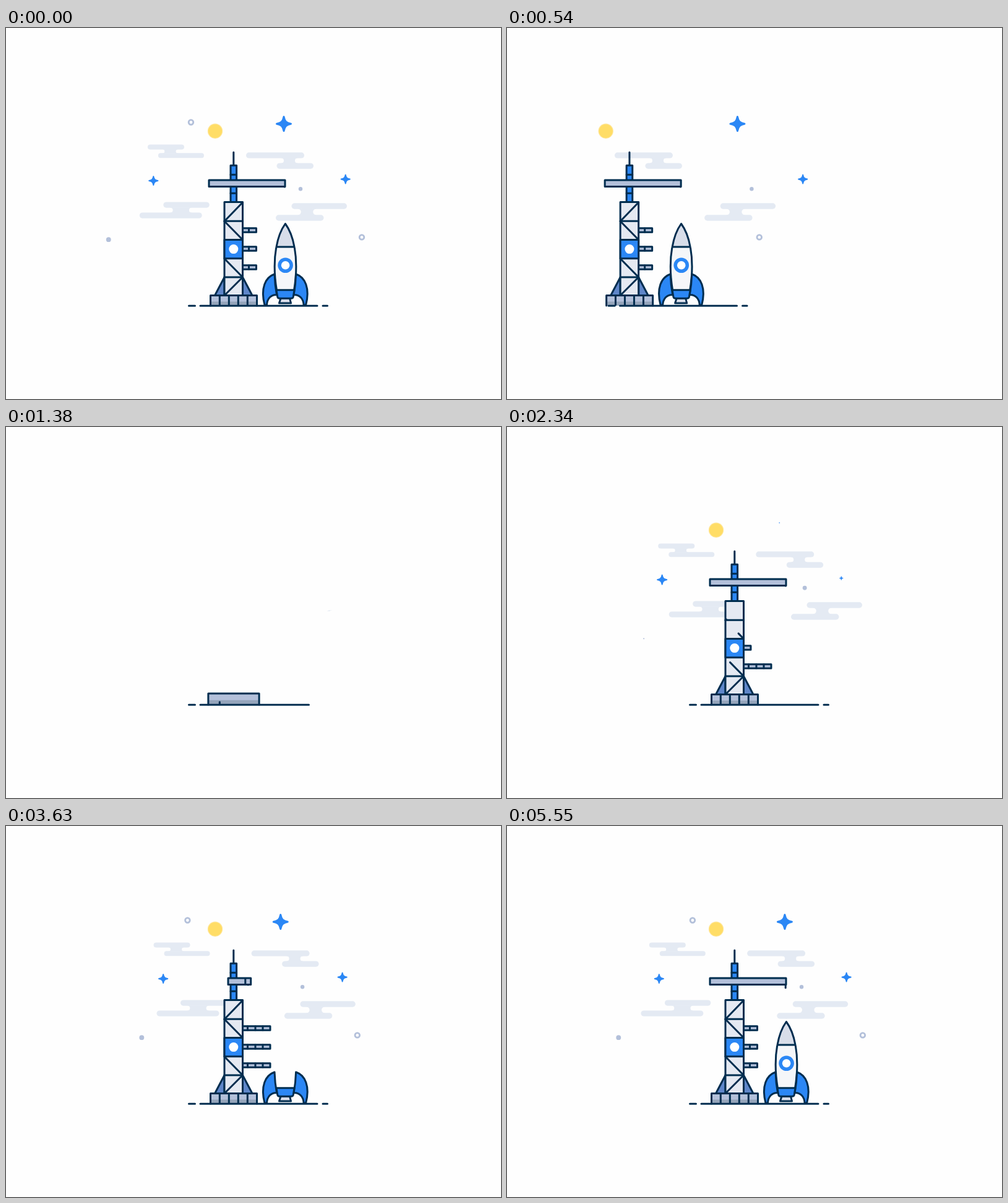
Write an HTML page that moves like this. It is 800 px wide and 600 px high and loops after 5580 ms.

```html
<!DOCTYPE html>
<html lang="en">
<head>
<meta charset="utf-8">
<title>Rocket launch pad</title>
<style>
html, body { margin: 0; width: 100%; height: 100%; overflow: hidden; background: #fefefe; }
svg { display: block; width: 100vw; height: 100vh; }
.ink { stroke: #002d4f; stroke-width: 3; stroke-linecap: round; stroke-linejoin: round; fill: none; }
.ink * { vector-effect: non-scaling-stroke; }
.cloud { fill: #e4eaf3; }
.blue { fill: #2b87f5; }
.steel { fill: #b3c0da; }
.ring { fill: none; stroke: #b3c0da; stroke-width: 2.8; }
.star { fill: #2b87f5; stroke: #2b87f5; stroke-width: 3; stroke-linejoin: round; }
</style>
</head>
<body>
<svg id="stage" viewBox="0 0 800 600"></svg>
<script>
const LOOP = 5580, GONE = 900, BUILD = 1000;
const stage = document.getElementById('stage');
const $ = id => document.getElementById(id);
let now = 0;

// Two rounded bars joined by a neck with scooped sides.
function cloud(x1, x2, y1, x3, x4, y2, h, a, b) {
  const top = y1 + h, r = (y2 - top) / 2;
  const bar = (x, end, y) => `<rect x="${x}" y="${y}" width="${end - x}" height="${h}" rx="${h / 2}"/>`;
  return `<g class="cloud">${bar(x1, x2, y1)}${bar(x3, x4, y2)}
    <path d="M${a} ${top - .5}v.5a${r} ${r} 0 0 1 0 ${2 * r}v.5H${b}v-.5a${r} ${r} 0 0 1 0 ${-2 * r}v-.5Z"/></g>`;
}

const star = (x, y, k) => `<path class="star" transform="translate(${x} ${y}) scale(${k})"
  d="M0-11.5C1.5-4 4-1.5 11.5 0C4 1.5 1.5 4 0 11.5C-1.5 4-4 1.5-11.5 0C-4-1.5-1.5-4 0-11.5Z"/>`;
const disc = (x, y, r, cls) => `<circle cx="${x}" cy="${y}" r="${r}" class="${cls}"/>`;

// pivot, pop-in start, drift per ms, leave start, leave distance after 540 ms
const sky = [
  { x: 275, y: 199, pop: 1400, drift: -.0044, leave: -120, far: 408,
    art: cloud(230, 289, 188.5, 247, 321, 202.3, 8, 254.5, 278.5) },
  { x: 442, y: 214, pop: 1430, drift: -.0044, leave: 0, far: 212.5,
    art: cloud(388, 482, 201.3, 437.5, 497, 218.5, 9.2, 445, 471) },
  { x: 272, y: 294, pop: 1460, drift: -.0141, leave: -80, far: 425,
    art: cloud(254.5, 329, 281.5, 216, 317, 298.5, 9.2, 266, 300) },
  { x: 493, y: 297, pop: 1377, drift: -.0071, leave: 0, far: 116,
    art: cloud(461.5, 551, 283.3, 436, 513.5, 302.3, 9.4, 472, 501) },
  { x: 338, y: 166.7, pop: 1644, drift: 0, leave: 0, far: 177,
    art: '<circle cx="338" cy="166.7" r="12.2" fill="#ffe69a"/><circle cx="338" cy="166.7" r="11" fill="#ffdd66"/>' },
  { x: 299 + 1.6, y: 152.5, pop: 2520, drift: .0037, leave: -130, far: 476, art: disc(300.6, 152.5, 3.8, 'ring') },
  { x: 575, y: 338.4, pop: 2830, drift: .0037, leave: 0, far: 166, art: disc(575, 338.4, 3.8, 'ring') },
  { x: 216.6, y: 342.2, pop: 2322, drift: -.0014, leave: -373, far: 221, art: disc(216.6, 342.2, 3.9, 'steel') },
  { x: 476, y: 260.3, pop: 2200, drift: -.0016, leave: 0, far: 80, art: disc(476, 260.3, 3.2, 'steel') },
  { x: 449, y: 155, pop: 2336, drift: .0027, leave: 0, far: 76, art: star(449, 155, 1) },
  { x: 259.4, y: 247, pop: 2210, drift: .0027, leave: -285, far: 268, art: star(259.4, 247, .62) },
  { x: 548.7, y: 244.5, pop: 2310, drift: .0026, leave: 0, far: 70, art: star(548.7, 244.5, .62) }
];

const armY = [387, 357, 327];
const arm = (y, i) => `<g id="arm${i}"><path class="steel" d="M370 ${y - 3.2}H427V${y + 3.2}H370Z"/>
  <path d="M390.5 ${y - 3}v6M403 ${y - 3}v6M415 ${y - 3}v6"/></g>`;
const diagonals = ['M382.5 403L353.5 432', 'M382.5 403L353 373', 'M382.5 342.5L353 312.5', 'M353 312.5L382.5 282'];
const wing = `<path class="blue" d="M434 398C419 403 411 421 418 448H421.5C422 438 428 431 437.5 431.5Q434.5 415 434 398Z"/>`;

stage.innerHTML = `
<defs>
  <clipPath id="armClip"><rect x="382" y="310" width="60" height="90"/></clipPath>
  <clipPath id="hullClip"><rect id="hullRect" x="425" width="53"/></clipPath>
</defs>
<g id="all">
  ${sky.map((s, i) => `<g id="sky${i}">${s.art}</g>`).join('')}
  <g id="tower" class="ink">
    <g clip-path="url(#armClip)">${armY.map(arm).join('')}</g>
    <g id="braces"><path fill="#5f86c9" d="M353 403L337.5 432.5H353ZM382.5 403L398 432.5H382.5Z"/></g>
    <path id="antenna" d="M367.8 222V201"/>
    <g id="mast"><path class="blue" d="M363 222.3H372.6V281.5H363Z"/><path d="M363 237.3h9.6M363 267.3h9.6"/></g>
    <g id="frame">
      <path fill="#e5e9f2" d="M353 281.5H382.5V432.5H353Z"/>
      <path d="M353 312.3H382.5M353 403H382.5"/>
      <path class="blue" d="M353 342.5H382.5V372.8H353Z"/>
    </g>
    ${diagonals.map((d, i) => `<path id="diag${i}" d="${d}" pathLength="100"/>`).join('')}
    <g id="sign"><circle cx="367.8" cy="357.6" r="7.5" fill="#fff" stroke="none"/></g>
    <g id="boom"><path id="jib" class="steel"/><path id="rope"/></g>
    <g id="base">
      <path fill="#b3c0da" stroke="none" d="M330.5 432.5H405.5V449H330.5Z"/>
      <path fill="#95a5bb" stroke="none" d="M330.5 442.5H405.5V449H330.5Z"/>
      <path d="M330.5 449V432.5H405.5V449"/>
    </g>
    ${[345.3, 360.3, 375.3, 390.3].map((x, i) => `<path id="rib${i}" d="M${x} 448V433" pathLength="100"/>`).join('')}
  </g>
  <g id="ground" class="ink"><path id="line"/></g>
  <g id="rocket" class="ink">
    <path id="hull" fill="#f5f6f9" stroke="none"
      d="M437 354Q431 386 437.5 424H465.5Q472 386 466 354Z"/>
    <g clip-path="url(#hullClip)"><path stroke-linecap="butt" d="M437 353Q431 386 437.5 424M466 353Q472 386 465.5 424"/></g>
    <g id="nozzle"><path fill="#d8dde9" d="M444 437H458.5L460.5 445H441.5Z"/></g>
    <g id="wings">${wing}<g transform="translate(902.6) scale(-1 1)">${wing}</g></g>
    <g id="tank"><path class="blue" d="M437 423.7H466L464.3 434.5Q463.8 437.2 461 437.2H442Q439.2 437.2 438.7 434.5Z"/></g>
    <g id="nose"><path fill="#d8dde9" d="M437 354Q441 331 451.4 316.5Q462 331 466 354Z"/></g>
    <g id="badge" stroke="none"><circle class="blue" cx="451.6" cy="383.8" r="12.3"/>
      <circle cx="451.6" cy="383.8" r="6.8" fill="#fff"/></g>
  </g>
</g>`;

const clamp = p => Math.max(0, Math.min(1, p));
const smooth = p => p * p * (3 - 2 * p);
const easeOut = p => 1 - (1 - p) * (1 - p);
const back = p => p <= 0 ? 0 : 1 + 2.7 * (p - 1) ** 3 + 1.7 * (p - 1) ** 2;
const mix = (a, b, p) => a + (b - a) * p;

// Progress of one build step; everything stands complete while leaving.
const step = (start, dur) => now < BUILD ? 1 : clamp((now - start) / dur);

function show(el, on) { el.style.display = on ? '' : 'none'; }

function scale(id, x, y, sx, sy, dx = 0) {
  const el = $(id);
  show(el, sx > .001 && sy > .001);
  el.setAttribute('transform', `translate(${x + dx} ${y}) scale(${sx} ${sy}) translate(${-x} ${-y})`);
}

function trace(id, p) {
  const el = $(id);
  show(el, p > 0);
  el.setAttribute('stroke-dasharray', p < 1 ? `${100 * p} 300` : 'none');
}

function slide(id, x) { $(id).setAttribute('transform', `translate(${x} 0)`); }

function drawGround() {
  let left = 206.5 * easeOut(step(1095, 420));
  const d = [[295.5, 10], [314, 189], [512, 7.5]].map(([x, w]) => {
    const len = Math.min(w, left);
    left -= len;
    return len > 0 ? `M${x} 449.2h${len}` : '';
  }).join('');
  $('line').setAttribute('d', d);
}

function drawCrane() {
  const open = smooth(step(1980, 300));
  const turn = smooth(step(2500, 420)) - smooth(step(4750, 450));
  const reach = x => 367.8 + (x - 367.8) * open;
  const l = reach(mix(328, 359, turn)), r = reach(mix(451, 395.7, turn));
  const split = reach(mix(451, 386.8, turn)), hook = reach(mix(450.2, 391.2, turn));
  const drop = 32 * (smooth(step(4150, 500)) - step(5380, 200));
  show($('boom'), open > 0);
  $('jib').setAttribute('d', `M${l} 246H${r}V256.5H${l}ZM${split} 246V256.5`);
  $('rope').setAttribute('d', `M${hook} 256.5V${257 + drop}`);
}

function drawTower() {
  const base = back(step(1180, 320));
  scale('base', 368, 449, base, base);
  for (let i = 0; i < 4; i++) trace('rib' + i, smooth(step(1320 + i * 70, 200)));
  scale('frame', 367.8, 432.5, 1, smooth(step(1368, 420)));
  scale('braces', 367.8, 432.5, 1, smooth(step(1700, 220)));
  scale('mast', 367.8, 281.5, 1, smooth(step(1760, 240)));
  scale('antenna', 367.8, 222, 1, smooth(step(1980, 180)));
  const sign = back(step(2050, 300));
  scale('sign', 367.8, 357.6, sign, sign);
  [2040, 2140, 2235, 2302].forEach((s, i) => trace('diag' + i, smooth(step(s, 300))));
  armY.forEach((y, i) => {
    const out = smooth(step(2036 + i * 200, 300));
    show($('arm' + i), out > 0);
    slide('arm' + i, -46 * (1 - out) - 22.5 * smooth(step(4320 + i * 150, 300)));
  });
  drawCrane();
}

function drawRocket() {
  scale('nozzle', 451.3, 445, 1, smooth(step(2680, 240)));
  const tank = back(step(2880, 320));
  scale('tank', 451.5, 437, tank, tank);
  scale('wings', 451.3, 448, 1, smooth(step(3200, 380)));
  const top = mix(424, 354.8, smooth(step(3960, 500)));
  $('hullRect').setAttribute('y', top);
  $('hullRect').setAttribute('height', 424 - top);
  $('hull').setAttribute('opacity', step(4600, 250));
  scale('nose', 451.5, 354, 1, smooth(step(4620, 360)));
  const badge = back(step(5090, 320));
  scale('badge', 451.6, 383.8, badge, badge);
}

function draw(t) {
  now = t;
  const u = t < BUILD ? t : t - LOOP;
  const away = (leave, far) => -far * (Math.max(0, u - leave) / 540) ** 4;
  show($('all'), t < GONE || t >= 1110);
  sky.forEach((s, i) => {
    const k = back(step(s.pop, 300));
    scale('sky' + i, s.x, s.y, k, k, s.drift * Math.min(u, 0) + away(s.leave, s.far));
  });
  drawGround();
  drawTower();
  drawRocket();
  slide('ground', away(0, 130.5));
  slide('tower', away(0, 168.6));
  slide('rocket', away(0, 168.6));
}

const begin = performance.now();
function tick() {
  draw((performance.now() - begin) % LOOP);
  requestAnimationFrame(tick);
}
tick();
</script>
</body>
</html>
```
